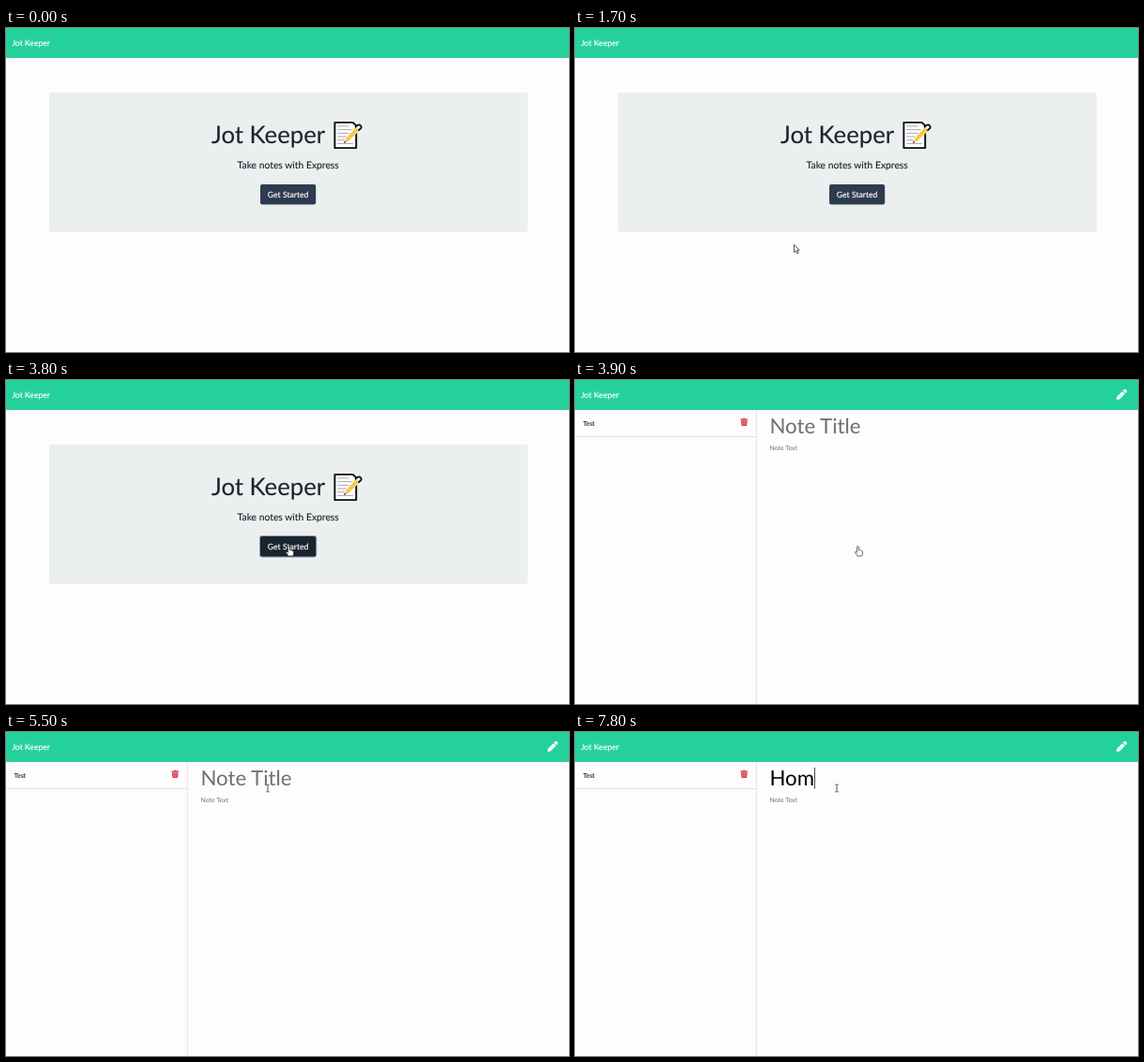
An HTML page that plays this animation: 600x346 px, repeating every 8000 ms.

```html
<!DOCTYPE html>
<html lang="en">
<head>
<meta charset="utf-8">
<title>Jot Keeper</title>
<style>
  html, body { margin: 0; width: 100%; height: 100%; overflow: hidden; background: #fefdfe; }
  svg { display: block; width: 100vw; height: 100vh; }
  text {
    font-family: Lato, sans-serif; fill: #1f2327; white-space: pre;
    text-rendering: geometricPrecision;
  }
  .mid { text-anchor: middle; }
  .light { fill: #fff; stroke: #fff; stroke-width: .18; }
  .dark { stroke: #1f2327; stroke-width: .12; }
  .hint { fill: #70706e; }
</style>
</head>
<body>
<svg viewBox="0 0 600 346" xmlns="http://www.w3.org/2000/svg">
  <rect width="600" height="346" fill="#fefdfe"/>
  <rect width="600" height="32" fill="#24d19d"/>
  <text class="light" x="6.4" y="18.7" font-size="8.62">Jot Keeper</text>

  <g id="home">
    <rect x="46" y="68.8" width="510" height="149.2" rx="2" fill="#ebeff0"/>
    <text class="dark" x="219" y="123.2" font-size="25.73">Jot Keeper</text>
    <g transform="translate(-.8 -.1)" stroke-linejoin="round" stroke-linecap="round">
      <path d="M351.2 101H370.5L374 104.5V128.2H351.2Z" fill="#fff" stroke="#0b0b0d" stroke-width="1.9"/>
      <path d="M354.3 105H366M354.3 108.7H369M354.3 112.4H366M354.3 116.1H363M354.3 119.8H361M354.3 123.5H370.5" stroke="#aaa4b8" stroke-width="1"/>
      <path d="M361.3 122.6L363 117.6L374.8 104.6Q377.4 102.6 379 104.8T378.4 108L366.4 120.6Z" fill="#f4cb45" stroke="#fff" stroke-width=".6"/>
      <path d="M373.4 105.8L374.8 104.3Q377.2 102.6 378.8 104.4T378.3 107.8L376.8 109.3" fill="#f0eee8" stroke="#0b0b0d" stroke-width="1.8"/>
      <path d="M360.8 123L361.6 120.7L363.2 122.2Z" fill="#222"/>
    </g>
    <text class="mid dark" x="300.7" y="149.8" font-size="10.34">Take notes with Express</text>
    <rect id="ring" x="270" y="166" width="61.2" height="23.4" rx="2.8" fill="#929aa2"/>
    <rect id="btn" x="271" y="167" width="59.2" height="21.6" rx="2.1"/>
    <text class="mid light" x="300.6" y="180.9" font-size="8.62">Get Started</text>
  </g>

  <g id="notes">
    <path d="M193.3 32V346M0 60.6H193" stroke="#e2e1e3" stroke-width=".9"/>
    <text class="dark" x="8.8" y="49" font-size="6.89">Test</text>
    <g fill="#d8404f">
      <path d="M176.3 41.6H178.6L179.1 40.7H181.4L181.9 41.6H184.2V42.7H176.3Z"/>
      <path d="M176.9 43.2H183.6L183.2 48.3Q183.1 49.1 182.3 49.1H178.2Q177.4 49.1 177.3 48.3Z"/>
      <path d="M178.7 44.3V48M180.25 44.3V48M181.8 44.3V48" stroke="#f2b3b9" stroke-width=".45"/>
    </g>
    <g fill="#fff">
      <path d="M577 21L577.6 17.8L583.4 12L586.1 14.7L580.3 20.5Z"/>
      <path d="M584 11.4L585.2 10.2Q586 9.5 586.8 10.2L587.9 11.3Q588.6 12.1 587.9 12.9L586.7 14.1Z"/>
    </g>
    <text id="title" x="207.5" y="57.4" font-size="22.2"></text>
    <text class="hint" x="207.6" y="75.3" font-size="6.89">Note Text</text>
    <rect id="caret" y="38" width="1" height="22.6" fill="#3c4543"/>
  </g>

  <g id="arrow" fill="#fff" stroke="#333" stroke-width=".8" stroke-linejoin="round">
    <path d="M0 0V8.3L1.9 6.6L3.2 9.6L4.6 9L3.3 6.1H5.6Z"/>
  </g>
  <g id="hand" fill="#fff" stroke="#333" stroke-width=".75" stroke-linejoin="round">
    <path d="M-1.7 1.5V-4.3Q-1.7 -5.4 -.8 -5.4T.1 -4.3V-1.3Q1 -1.9 1.6 -.9Q2.5 -1.3 3 -.4Q4.2 -.5 4.2 .8V2.5Q4.2 3.8 3.3 5.2H-1.2Q-2 3.7 -3.6 1.9Q-4.3 .9 -3.4 .5Q-2.7 .3 -1.7 1.5Z"/>
  </g>
  <g id="beam" fill="none" stroke="#3b3b3b" stroke-width=".85">
    <path d="M-1.8 -3.9Q-.2 -3.9 0 -3.3Q.2 -3.9 1.8 -3.9M0 -3.3V3.3M-1.8 3.9Q-.2 3.9 0 3.3Q.2 3.9 1.8 3.9"/>
  </g>
</svg>
<script>
  const LOOP = 8000, STEP = 100;
  const $ = id => document.getElementById(id);
  const show = (id, on) => $(id).setAttribute('visibility', on ? 'visible' : 'hidden');

  // time, x, y of the pointer
  const path = [
    [1300, 200, 311], [1400, 224, 280], [1500, 243, 252], [1600, 239, 238],
    [1700, 233.5, 231.2], [2100, 233.5, 231.2], [2300, 168, 158], [2500, 36, 38],
    [2600, 9, 17], [2700, 50, 42], [2900, 256, 156], [3000, 302.3, 182.8],
    [3900, 302.3, 182.8], [4200, 302, 134], [4400, 301.5, 102.5],
    [4600, 286, 72], [4700, 280.4, 64.3], [4900, 279, 60]
  ];
  // time, typed text
  const typing = [[0, ''], [6500, 'H'], [6800, 'Ho'], [7000, 'Hoe'], [7600, 'Ho'], [7800, 'Hom']];

  function pointAt(t) {
    const i = path.findIndex(p => p[0] > t);
    if (i < 0) return path[path.length - 1].slice(1);
    if (i === 0) return path[0].slice(1);
    const [a, b] = [path[i - 1], path[i]];
    const k = (t - a[0]) / (b[0] - a[0]);
    return [1, 2].map(n => a[n] + (b[n] - a[n]) * k);
  }

  function pointerAt(t) {
    if (t < 1300) return '';
    if (t < 3000) return 'arrow';
    return t < 4000 ? 'hand' : 'beam';
  }

  function buttonFill(t) {
    if (t < 3000) return '#2d3c4f';
    return t < 3600 ? '#1f2b38' : '#1a2430';
  }

  function draw(t) {
    const onHome = t < 3900;
    show('home', onHome);
    show('notes', !onHome);
    show('ring', onHome && t >= 3600);
    $('btn').setAttribute('fill', buttonFill(t));

    const typed = typing.filter(k => k[0] <= t).pop()[1];
    const title = $('title');
    title.textContent = typed || 'Note Title';
    title.setAttribute('class', typed ? '' : 'hint');
    title.style.fill = typed ? '#000' : '';
    show('caret', t >= 5100 && !(t >= 5500 && t < 6100));
    $('caret').setAttribute('x', 207.5 + (typed ? title.getComputedTextLength() : 0));

    const [x, y] = pointAt(t), kind = pointerAt(t);
    for (const id of ['arrow', 'hand', 'beam']) {
      show(id, id === kind);
      $(id).setAttribute('transform', `translate(${x} ${y})`);
    }
  }

  const start = performance.now();
  function tick() {
    const t = (performance.now() - start) % LOOP;
    draw(Math.floor(t / STEP) * STEP);
    requestAnimationFrame(tick);
  }
  tick();
</script>
</body>
</html>
```
